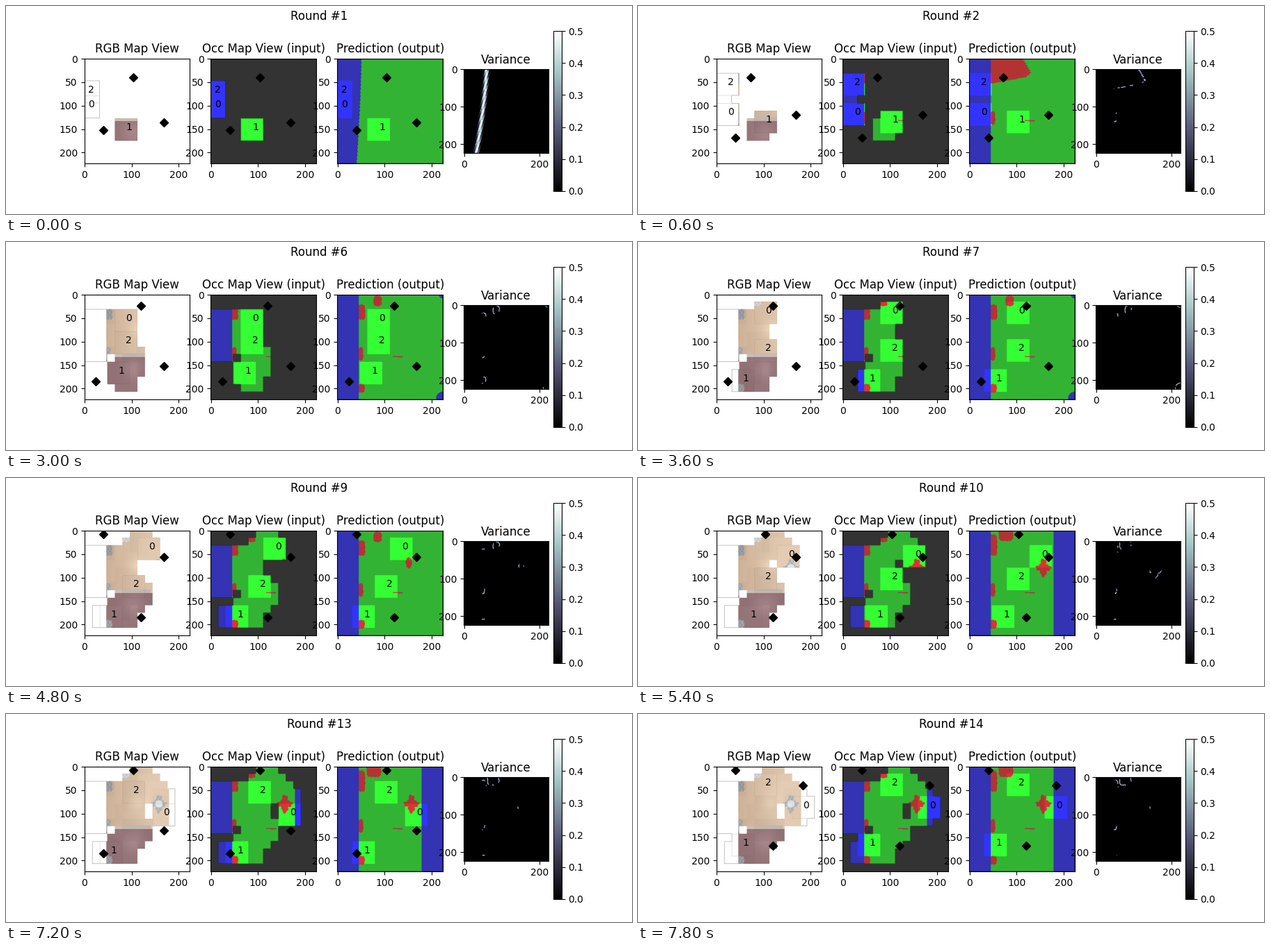
Write a matplotlib script that moves like this. It is 900x300 px and loops after 8 s.

```python
import numpy as np
import matplotlib.pyplot as plt
from matplotlib.animation import FuncAnimation

N = 224
ROUNDS = 14
HOLD = 3  # animation ticks per round
Y, X = np.mgrid[0:N, 0:N].astype(float)


def cell(c):
    return 16 * c[0] + 8, 16 * c[1] + 8


def walk(*stops):
    """One grid cell per round, diagonals allowed, from stop to stop."""
    pos = np.array(stops[0])
    path = [tuple(pos)]
    for stop in stops[1:]:
        while tuple(pos) != stop:
            pos = pos + np.sign(np.subtract(stop, pos))
            path.append(tuple(pos))
    return path


AGENTS = [
    walk((0, 6), (1, 7), (7, 1), (10, 4), (10, 6), (11, 5)),
    walk((5, 9), (6, 8), (6, 9), (5, 11), (4, 10), (2, 11),
         (4, 11), (2, 11), (3, 11), (3, 10)),
    walk((0, 4), (1, 3), (2, 3), (7, 8), (6, 2)),
]

# Goal of each agent, keyed by the round in which it is set
GOALS = [
    {1: (2, 9), 2: (2, 10), 3: (10, 4), 4: (11, 4), 5: (7, 1),
     9: (10, 3), 11: (10, 8), 14: (11, 2)},
    {1: (10, 8), 2: (10, 7), 3: (5, 11), 6: (1, 11), 9: (7, 11),
     11: (2, 11), 14: (7, 10)},
    {1: (6, 2), 2: (4, 2), 5: (10, 9), 9: (2, 0), 10: (6, 0), 14: (2, 0)},
]


def goal(plan, n):
    return cell(plan[max(k for k in plan if k <= n)])


def box(x0, y0, x1, y1):
    return (X >= x0) & (X < x1) & (Y >= y0) & (Y < y1)


def footprint(c):
    x, y = cell(c)
    return box(x - 24, y - 24, x + 24, y + 24)


def blob(x0, y0, x1, y1, power=4):
    u = (2 * X - x0 - x1) / (x1 - x0)
    v = (2 * Y - y0 - y1) / (y1 - y0)
    wobble = 0.12 * np.sin(0.9 * X + 0.5 * Y) + 0.1 * np.sin(0.7 * Y - 0.4 * X)
    return abs(u) ** power + abs(v) ** power < 1 + wobble


def star(cx, cy):
    a = np.arctan2(Y - cy, X - cx)
    r = np.hypot((X - cx) * 1.2, Y - cy)
    return r < 15.5 + 4 * np.cos(4 * a) + 1.5 * np.cos(11 * a + 1)


def rim(mask, outside=False):
    """Border pixels of a mask; `outside` counts the map's own edge too."""
    if outside:
        p = np.pad(mask, 1)
    else:
        p = np.pad(mask, 1, mode="edge")
    return mask & ~(p[:-2, 1:-1] & p[2:, 1:-1] & p[1:-1, :-2] & p[1:-1, 2:])


# Ground truth
CABINET = blob(44, 31, 58, 54, 8)
SHELF = blob(43, 113, 55, 141)
BENCH = blob(44, 191, 58, 209)
STOVE = blob(79, 14, 94, 25, 8)
RAIL = box(118, 132, 139, 134) | box(128, 134, 139, 135)
TABLE = star(157, 80)
LEFT, RIGHT = X < 46, X >= 179
WALL = LEFT | RIGHT
THINGS = (CABINET | SHELF | BENCH | STOVE | TABLE) & ~WALL

# Predicted shapes: first round, last round, mask
CORNERS = (np.hypot(X - 224, Y) < 9) | (np.hypot(X - 224, Y - 222) < 15)
TIP = np.interp(Y, [0, 31, 40, 54], [113, 131, 120, 48]) + 1.5 * np.sin(1.3 * Y)
WALL_GUESS = [
    (1, 1, X < 51 - 10 * (Y / N) ** 1.5 + 0.7 * np.sin(0.8 * Y)),
    (2, ROUNDS, LEFT),
    (6, 7, CORNERS),
    (10, ROUNDS, RIGHT),
]
RED_GUESS = [
    (2, 2, (X < TIP) & (Y < 54)),
    (2, ROUNDS, SHELF),
    (3, 9, blob(43, 22, 59, 54)),
    (6, ROUNDS, BENCH),
    (6, 9, blob(77, 3, 94, 25)),
    (8, 9, blob(145, 57, 158, 81, 2)),
    (10, ROUNDS, blob(43, 9, 59, 54)),
    (10, ROUNDS, blob(62, -6, 93, 23)),
    (10, ROUNDS, TABLE),
]


def active(shapes, n):
    out = np.zeros((N, N), bool)
    for first, last, mask in shapes:
        if first <= n <= last:
            out |= mask
    return out


def paint(wall, red, rail, known, current):
    """Blue walls, red objects, green floor; brighter inside current views."""
    img = np.full((N, N, 3), 51.0)
    layer = np.where(wall, 2, np.where(red | rail, 0, 1))
    for k, bright in enumerate((220, 255, 255)):
        m = known & (layer == k)
        img[m, k] = np.where(current, bright, 179)[m]
    img[rail & known & ~wall, 2] = 85
    img[rim(known, outside=True)] *= 0.6
    return img.astype(np.uint8)


def room():
    t = np.clip((X - 45) / 90, 0, 1)[..., None]
    glow = np.exp(-((X - 112) ** 2 + (Y - 76) ** 2) / 300)[..., None]
    shine = np.exp(-((X - 104) ** 2 + (Y - 158) ** 2) / 600)[..., None]
    img = np.array([201, 174, 148]) + t * np.array([22, 25, 27]) + 14 * glow
    mauve = np.array([146, 114, 118]) + 18 * shine
    img = np.where((Y >= 134)[..., None], mauve, img)
    img[box(45, 126, 140, 134)] = (200, 187, 178)
    grain = 14 * np.sin(0.8 * X) * np.sin(0.6 * Y)
    for thing, tone in ((CABINET, 158), (SHELF, 168), (BENCH, 156),
                        (STOVE, 205), (TABLE, 180)):
        img[thing] = (tone + grain[thing])[:, None] + np.array([-2, 0, 4])
    img[np.hypot(X - 157, Y - 80) < 8] = (222, 224, 226)
    img[WALL] = 255
    return img


ROOM = room()


def blur(a, passes):
    for _ in range(passes):
        a = (a + sum(np.roll(a, s, ax) for s in (-1, 1) for ax in (0, 1))) / 5
    return a


def variance(n, seen):
    """Uncertainty sits on patches of unseen predicted outlines."""
    rng = np.random.default_rng(n)
    rough = rng.uniform(0.45, 1, (N, N))
    if n == 1:
        mid = 60 - 27 * (Y / N) ** 1.4
        streak = 2 * np.sin((X + Y / 3) * 1.1)
        return np.minimum(0.5, 0.8 * np.exp(-((X - mid + streak) / 4.5) ** 2) * rough)
    edge = rim(active(RED_GUESS, n) | active(WALL_GUESS, n)) & ~seen
    edge &= (abs(X - 45.5) > 2) & (abs(X - 179) > 2)
    patch = blur(rng.uniform(0, 1, (N, N)), 20)
    edge = edge & (patch > np.quantile(patch, 0.4))
    out = np.minimum(0.5, 1.3 * blur(edge.astype(float), 1) * rough)
    return np.where(out < 0.12, 0, out)


def build():
    seen = np.zeros((N, N), bool)
    everything = ~seen
    tint = np.ones((N, N))
    rng = np.random.default_rng(5)
    rounds = []
    for n in range(1, ROUNDS + 1):
        views = [footprint(path[n - 1]) for path in AGENTS]
        current = np.any(views, axis=0)
        frames = np.any([rim(v) for v in views], axis=0)
        for view in views:
            tint[view] = rng.uniform(0.97, 1.03)
        seen = seen | current

        shade = np.where(WALL, 1, tint * np.where(frames, 0.93, 1))
        rgb = np.where(seen[..., None], ROOM * shade[..., None], 255)
        rgb[frames & WALL] = 215
        rgb[rim(seen) & WALL] = 165
        rgb = np.clip(rgb, 0, 255).astype(np.uint8)

        occ = paint(WALL, THINGS, RAIL, seen, current)
        pred = paint(active(WALL_GUESS, n), active(RED_GUESS, n),
                     RAIL & (n > 1), everything, current)
        rounds.append((rgb, occ, pred, variance(n, seen)))
    return rounds


DATA = build()

fig, axes = plt.subplots(1, 4, figsize=(9, 3), dpi=100)
heading = fig.suptitle("Round #1")
titles = ["RGB Map View", "Occ Map View (input)", "Prediction (output)", "Variance"]
images, marks, labels = [], [], []
for ax, title, first in zip(axes, titles, DATA[0]):
    ax.set_title(title)
    images.append(ax.imshow(first, cmap="bone", vmin=0, vmax=0.5))
    ax.set_autoscale_on(False)
    if title == "Variance":
        fig.colorbar(images[-1], ax=ax)
    else:
        marks.append(ax.plot([], [], "kD")[0])
        labels.append([ax.text(0, 0, str(a)) for a in range(len(AGENTS))])


def update(frame):
    n = frame // HOLD + 1
    heading.set_text(f"Round #{n}")
    for im, data in zip(images, DATA[n - 1]):
        im.set_data(data)
    images[3].set_clim(0, 0.66 if n == 4 else 0.5)
    goals = [goal(plan, n) for plan in GOALS]
    for mark, texts in zip(marks, labels):
        mark.set_data(*zip(*goals))
        for text, path in zip(texts, AGENTS):
            text.set_position(cell(path[n - 1]))
    return []


anim = FuncAnimation(fig, update, frames=40, interval=200, repeat=True,
                     repeat_delay=0, init_func=lambda: update(0))
plt.show()
```
